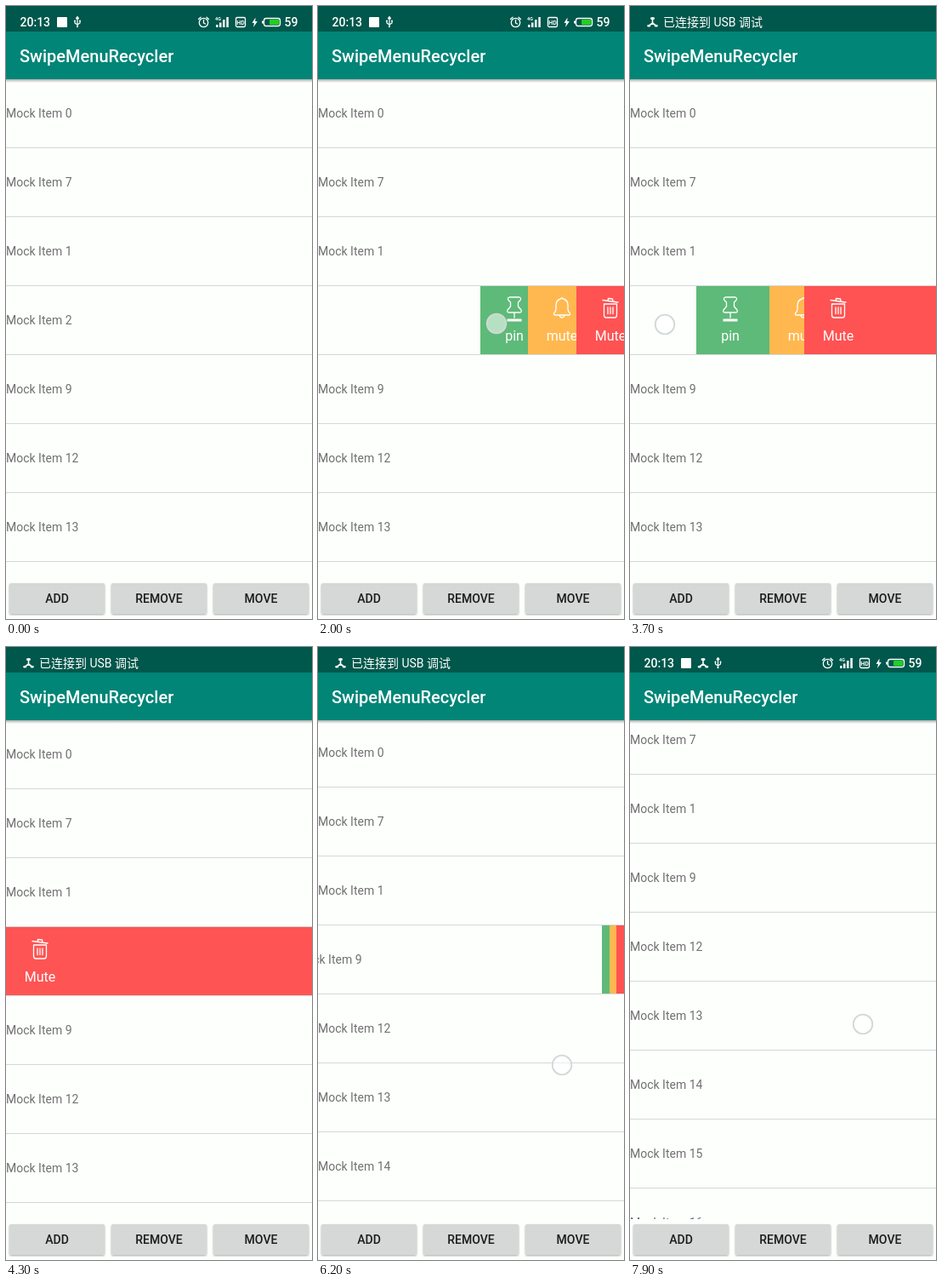
An HTML page for the animation above (8 s loop, 360x720 px).

```html
<!DOCTYPE html>
<html lang="en">
<head>
<meta charset="utf-8">
<title>Swipe menu list</title>
<style>
  html, body { margin: 0; width: 100%; height: 100%; overflow: hidden; background: #fdfffd; }
  svg { display: block; width: 360px; height: 720px; font: 14px Roboto, "Noto Sans CJK SC", "Noto Sans CJK", sans-serif; }
  .item { fill: #707070; }
  .label { font-size: 16px; fill: #fff; text-anchor: middle; }
  .button { font-weight: 500; fill: #1c1c1c; text-anchor: middle; }
  .line { fill: none; stroke: #fff; stroke-width: 1.3; stroke-linecap: round; stroke-linejoin: round; }
  .white { fill: #fff; }
</style>
</head>
<body>
<svg viewBox="0 0 360 720">
  <defs>
    <linearGradient id="shade" x2="0" y2="1">
      <stop stop-color="#000" stop-opacity=".32"/>
      <stop offset="1" stop-color="#000" stop-opacity="0"/>
    </linearGradient>
    <filter id="lift" x="-10%" y="-20%" width="120%" height="150%">
      <feDropShadow dx="0" dy="1" stdDeviation="1" flood-opacity=".35"/>
    </filter>
    <g id="adb" class="line">
      <path d="M0-5V1L-4 4M0 1L4 4" stroke-width="1.6"/>
      <path d="M-1.2-4.4H1.2M-5 4.2H-3.6M3.6 4.2H5" stroke-width="2.6"/>
    </g>
    <g id="usb" class="line">
      <path d="M0-5V5M-3-1V1L0 3L3 1V-1" stroke-width="1.2"/>
      <path d="M-1-4.5L0-6L1-4.5ZM-3-1.6V-1.4M3-1.6V-1.4M0 5V5.2" stroke-width="2"/>
    </g>
  </defs>

  <rect width="360" height="720" fill="#fdfffd"/>
  <g id="list"></g>

  <rect y="86" width="360" height="4" fill="url(#shade)"/>
  <rect y="30" width="360" height="56" fill="#008577"/>
  <text x="16" y="66" class="white" font-size="20" font-weight="500">SwipeMenuRecycler</text>
  <rect width="360" height="30" fill="#00574b"/>

  <g id="status" class="white">
    <text x="16.5" y="24" font-weight="500">20:13</text>
    <rect x="60" y="13" width="12" height="12" rx="1"/>
    <use id="adbIcon" href="#adb" x="86" y="19"/>
    <use id="usbIcon" href="#usb" y="19"/>
    <g class="line">
      <circle cx="232.5" cy="19.5" r="5.2"/>
      <path d="M232.5 16.5V20L234.5 21M226.5 15.5L229 13.3M238.5 15.5L236 13.3"/>
    </g>
    <text x="246" y="17" font-size="5.5" font-weight="700">4G</text>
    <path d="M247 22h2.5v3h-2.5zM251 19.5h2.5v5.5h-2.5zM255 16h2.5v9h-2.5zM259.3 13h2.5v12h-2.5z"/>
    <rect x="270.5" y="13.5" width="11" height="11" rx="1.5" class="line"/>
    <text x="276" y="21.7" font-size="7" font-weight="700" text-anchor="middle">HD</text>
    <path d="M293.5 13.5L289.5 20H292L291 25L295.8 18H293.2Z"/>
    <rect x="303.5" y="14.5" width="19" height="9" rx="2.5" class="line"/>
    <path d="M301 17.5h2v3h-2z"/>
    <rect x="310" y="16" width="11.5" height="6" rx="1" fill="#20d020"/>
    <text x="327.5" y="24" font-weight="500">59</text>
  </g>
  <g id="ticker" class="white">
    <use href="#adb" x="26.5" y="19"/>
    <text x="39" y="24">已连接到 USB 调试</text>
  </g>

  <rect y="672" width="360" height="48" fill="#fdfffd"/>
  <g id="buttons"></g>
  <circle id="touch" r="11.3" fill="#fff" fill-opacity=".55" stroke="#d3d7d7" stroke-width="1.8"/>
</svg>

<script>
const LOOP = 8000, TOP = 86, PITCH = 81, SLOT = 3, MENU = 240;
const REMOVED = 4400;
const $ = id => document.getElementById(id);

function add(parent, tag, attrs, text) {
  const el = document.createElementNS("http://www.w3.org/2000/svg", tag);
  for (const k in attrs) el.setAttribute(k, attrs[k]);
  if (text) el.textContent = text;
  return parent.appendChild(el);
}
const move = (el, x, y) => el.setAttribute("transform", `translate(${Math.round(x)} ${Math.round(y)})`);
const fade = (el, opacity) => el.setAttribute("opacity", opacity);

// Progress 0..1 from a start time over a duration
const ramp = (t, at, dur) => Math.min(1, Math.max(0, (t - at) / dur));
const smooth = (t, at, dur) => { const u = ramp(t, at, dur); return u * u * (3 - 2 * u); };
const settle = (t, at, dur) => 1 - (1 - ramp(t, at, dur)) ** 3;

// The finger drags the row a little, then the menu springs fully open
const open = (t, at) => 100 * smooth(t, at, 300) + (MENU - 100) * settle(t, at + 300, 250);
const close = (t, at) => MENU * settle(t, at, 295);

function swipeAt(t) {
  if (t >= REMOVED) return open(t, 4990) - close(t, 6047);
  return open(t, 350) - close(t, 1300) + open(t, 1650) - close(t, 2800)
    + 313 * smooth(t, 3150, 683) + 47 * settle(t, 4150, 150);
}
const scrollAt = t =>
  132 * smooth(t, 6150, 650) + 33 * settle(t, 6800, 550) - 67 * smooth(t, 7400, 500);

const pull = (at, x, y) => ({ at, dur: 300, x, y, dx: -100, dy: 0 });
const tap = at => ({ at, dur: 100, x: 83, y: 376, dx: 0, dy: 0 });
const touches = [
  pull(350, 310, 373), tap(1300), pull(1650, 310, 373), tap(2800),
  { at: 3150, dur: 683, x: 323, y: 371, dx: -313, dy: 3 },
  pull(4990, 129, 378),
  { at: 6150, dur: 650, x: 287, y: 493, dx: -7, dy: -132 },
  { at: 7400, dur: 500, x: 276, y: 376, dx: -2, dy: 67 }
];

const list = $("list");
const rows = [0, 7, 1, 2, 9, 12, 13, 14, 15, 16].map(n => {
  const row = add(list, "g");
  add(row, "rect", { y: 80, width: 360, height: 1, fill: "#d3d8d7" });
  const label = add(row, "text", { y: 45, class: "item" }, "Mock Item " + n);
  return { row, label };
});

const menu = add(list, "g");
const cells = [
  ["pin", "#5eba78", "M-6-13H6Q8.5-12 7-9.5L4.5-7V-2L8 2Q9 5 6.5 5H-6.5Q-9 5-8 2L-4.5-2V-7L-7-9.5Q-8.5-12-6-13ZM0 5V11"],
  ["mute", "#ffb84f", "M-1.5-11Q0-13 1.5-11Q7-9.5 7-3.5V1Q7 4 9.5 6Q10 8 8 8H-8Q-10 8-9.5 6Q-7 4-7 1V-3.5Q-7-9.5-1.5-11ZM-3 8Q-2.5 11 0 11T3 8"],
  ["Mute", "#ff5252", "M-9-9.5L9-7M-3-9L-2.5-11.5L2.5-11L3-8.5M-7.5-5H7.5V8Q7.5 11 5 11H-5Q-7.5 11-7.5 8ZM-3-1V6.5M0-1V6.5M3-1V6.5"]
].map(([name, color, icon], i) => {
  const cell = add(menu, "g");
  add(cell, "rect", { width: 400, height: 80, fill: color });
  add(cell, "path", { d: icon, class: "line", transform: "translate(40 26)" });
  if (!i) add(cell, "rect", { x: 31.5, y: 38.5, width: 17, height: 3, class: "white" });
  add(cell, "text", { x: 40, y: 64, class: "label" }, name);
  return cell;
});

["ADD", "REMOVE", "MOVE"].forEach((name, i) => {
  add($("buttons"), "rect", { x: 4 + 120 * i, y: 678, width: 112, height: 36, rx: 2, fill: "#d6d7d7", filter: "url(#lift)" });
  add($("buttons"), "text", { x: 60 + 120 * i, y: 701, class: "button" }, name);
});

function drawList(t) {
  const swipe = swipeAt(t), scroll = scrollAt(t);
  const removed = t >= REMOVED, gone = smooth(t, REMOVED, 250);
  const active = removed ? SLOT + 1 : SLOT;

  rows.forEach(({ row, label }, i) => {
    move(row, 0, TOP + PITCH * (i - (i > SLOT ? gone : 0)) - scroll);
    label.setAttribute("x", i === active ? -Math.round(swipe) : 0);
    fade(label, i === active && swipe > 60 ? 0 : 1);
  });
  fade(rows[SLOT].row, removed ? 0 : 1);

  // A long swipe lets the last cell grow over the others
  const grow = removed ? 0 : ramp(t, 3600, 310), third = swipe / 3;
  move(menu, 360 - swipe, TOP + PITCH * SLOT - scroll);
  fade(menu, removed ? 1 : 1 - ramp(t, REMOVED - 100, 100));
  move(cells[1], third * (1 - .27 * grow), 0);
  move(cells[2], third * 2 * (1 - grow), 0);
}

function drawStatus(t) {
  const shown = smooth(t, 3300, 200) - smooth(t, 6600, 200), late = t > 5000;
  fade($("status"), 1 - shown);
  fade($("ticker"), shown);
  move($("ticker"), 0, (1 - shown) * (late ? -12 : 12));
  fade($("adbIcon"), late ? 1 : 0);
  $("usbIcon").setAttribute("x", late ? 103.5 : 84);
}

function drawTouch(t) {
  const g = touches.find(g => t > g.at - 100 && t < g.at + g.dur + 100);
  fade($("touch"), g ? 1 : 0);
  if (!g) return;
  const u = smooth(t, g.at, g.dur);
  move($("touch"), g.x + g.dx * u, g.y + g.dy * u);
}

const start = performance.now();
function frame() {
  const t = (performance.now() - start) % LOOP;
  drawList(t);
  drawStatus(t);
  drawTouch(t);
  requestAnimationFrame(frame);
}
frame();
</script>
</body>
</html>
```
